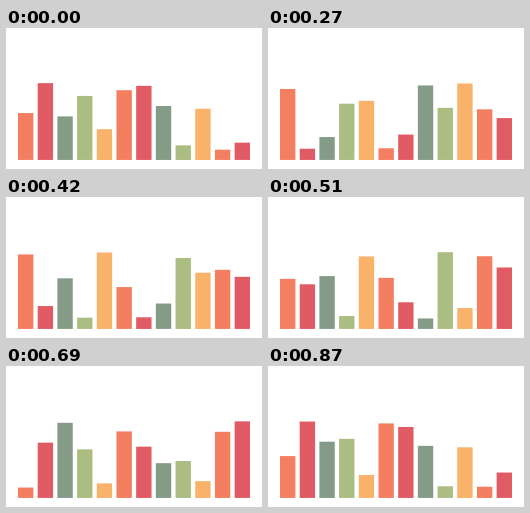
Recreate the animation shown at these times as a matplotlib script. Size 256 by 141 pixels, loop 0.9 s.

```python
import numpy as np
import matplotlib.pyplot as plt
from matplotlib.animation import FuncAnimation
from matplotlib.patches import Rectangle

W, H, DPI = 256, 141, 100
FRAMES, INTERVAL = 30, 30
UNIT = W / 100
BASE = H / 2 + 24 * UNIT
BAR_W = 6 * UNIT
COLORS = ["#f47e60", "#e15b64", "#849b87", "#abbd81", "#f8b26a"]

# Head start of each bar, in twelfths of the loop
STARTS = [0, 5, 7, 3, 11, 6, 4, 2, 10, 1, 9, 8]
LEVELS = [20, 30, 4, 20]

# Ease curve: cubic Bezier (0.5, 0, 0.5, 1)
u = np.linspace(0, 1, 1001)
EASE_X = 1.5 * u * (1 - u) + u**3
EASE_Y = 3 * u**2 - 2 * u**3


def bar_height(phase):
    pos = 3 * (phase % 1)
    seg = min(int(pos), 2)
    k = np.interp(pos - seg, EASE_X, EASE_Y)
    return UNIT * (LEVELS[seg] + (LEVELS[seg + 1] - LEVELS[seg]) * k)


fig = plt.figure(figsize=(W / DPI, H / DPI), dpi=DPI, facecolor="white")
ax = fig.add_axes([0, 0, 1, 1])
ax.set_xlim(0, W)
ax.set_ylim(H, 0)
ax.axis("off")

bars = []
for i in range(len(STARTS)):
    center = W * (i + 1) / (len(STARTS) + 1)
    bar = Rectangle((center - BAR_W / 2, BASE), BAR_W, 0,
                    color=COLORS[i % len(COLORS)], linewidth=0, snap=False)
    bars.append(ax.add_patch(bar))


def update(frame):
    for bar, start in zip(bars, STARTS):
        h = bar_height(frame / FRAMES + (start - 1) / 12)
        bar.set_y(BASE - h)
        bar.set_height(h)
    return bars


anim = FuncAnimation(fig, update, frames=FRAMES, interval=INTERVAL,
                     repeat=True, repeat_delay=0)
plt.show()
```
